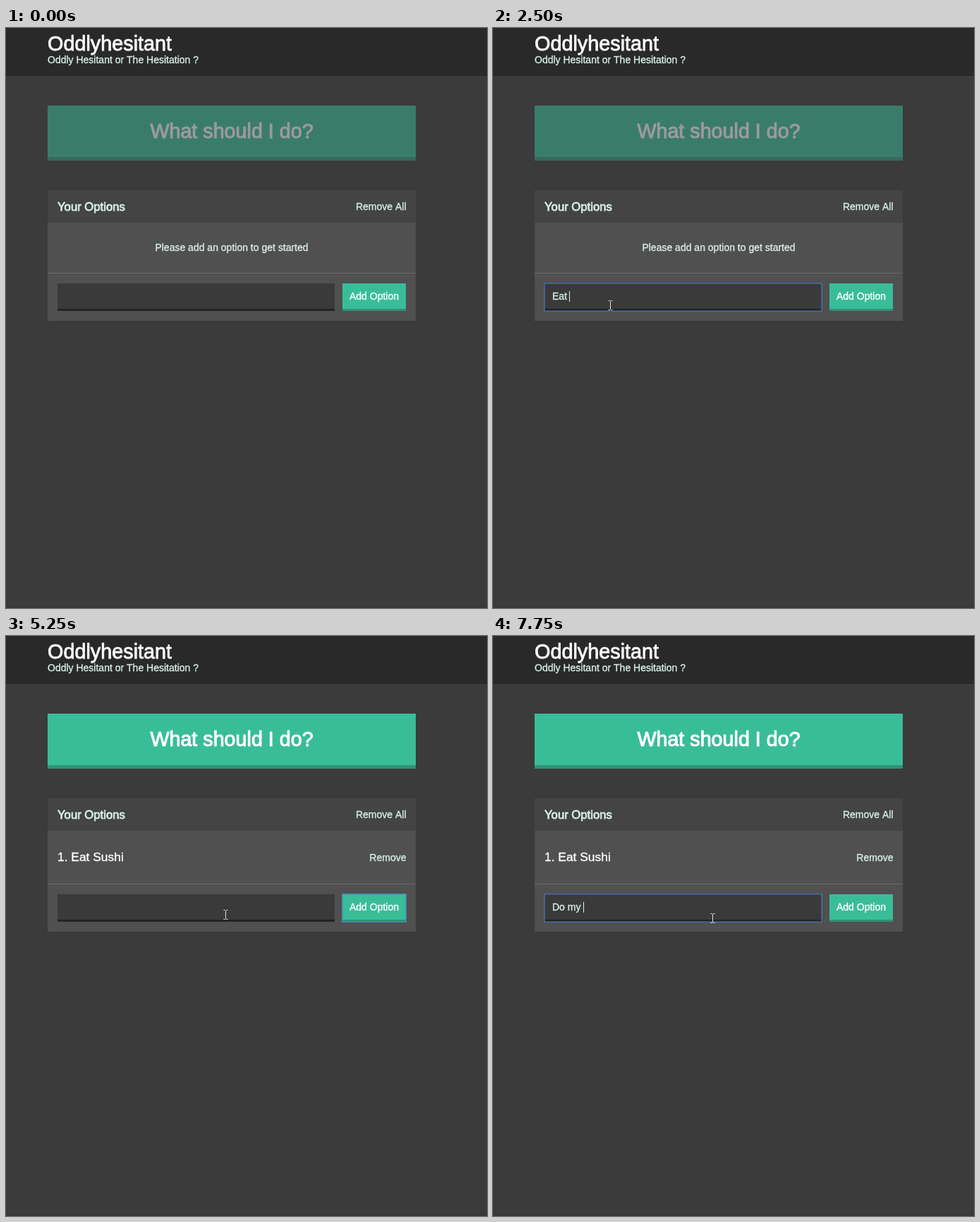
Write an HTML page with a canvas that moves like this. It is 682 px wide and 822 px high and loops after 8 s.

```html
<!DOCTYPE html>
<html lang="en">
<head>
<meta charset="utf-8">
<title>Option picker</title>
<style>
  html, body { margin: 0; width: 100%; height: 100%; overflow: hidden; background: #3b3b3b; }
  canvas { display: block; }
</style>
</head>
<body>
<canvas id="stage" width="682" height="822"></canvas>
<script>
const ctx = document.getElementById('stage').getContext('2d');
const LOOP = 8000;
const SANS = '"Liberation Sans", Arial, sans-serif';
const MENU_FONT = '"Open Sans", sans-serif';
const BODY = 14;
const PALE = '#d8efe9';
const GREEN = '#39bd99';
const HISTORY = ['a', 'd', 'b', 'c'];

// Each entry overrides the state from its time on.
const timeline = [
  { at: 0, typed: '', caret: false, focus: '', menu: null, added: false, pointer: null },
  { at: 750, pointer: ['arrow', 459, 528] },
  { at: 1000, pointer: ['beam', 200, 357] },
  { at: 1250, pointer: ['beam', 166.5, 393] },
  { at: 1500, focus: 'input', caret: true, menu: HISTORY },
  { at: 1750, typed: 'E', menu: null },
  { at: 2000, typed: 'Ea' },
  { at: 2250, typed: 'Eat' },
  { at: 2500, typed: 'Eat ' },
  { at: 2750, typed: 'Eat Su' },
  { at: 3000, typed: 'Eat Sush' },
  { at: 3250, typed: 'Eat Sushi' },
  { at: 3750, pointer: ['beam', 230, 392] },
  { at: 4000, pointer: ['beam', 400, 392] },
  { at: 4250, pointer: ['hand', 520, 389] },
  { at: 4500, pointer: ['hand', 534, 391] },
  { at: 4750, added: true, typed: '', caret: false, focus: 'button' },
  { at: 5000, pointer: ['beam', 420, 395] },
  { at: 5250, pointer: ['beam', 311.5, 395] },
  { at: 5500, focus: 'input', caret: true, menu: [...HISTORY, 'Eat Sushi'], pointer: ['beam', 311.5, 400] },
  { at: 6000, caret: false },
  { at: 6500, typed: 'D', caret: true, menu: ['d'] },
  { at: 6750, typed: 'Do', menu: null },
  { at: 7250, typed: 'Do ' },
  { at: 7500, typed: 'Do m' },
  { at: 7750, typed: 'Do my ' }
];

function rect(x, y, w, h, color) {
  ctx.fillStyle = color;
  ctx.fillRect(x, y, w, h);
}

// weight thickens the strokes to a medium face.
function text(str, x, y, { size = BODY, color = PALE, align = 'left', weight = .35, family = SANS } = {}) {
  ctx.font = `${size}px ${family}`;
  ctx.textAlign = align;
  ctx.fillStyle = ctx.strokeStyle = color;
  ctx.fillText(str, x, y);
  if (weight) {
    ctx.lineWidth = weight;
    ctx.lineJoin = 'round';
    ctx.strokeText(str, x, y);
  }
}

function ring(x, y, w, h, color) {
  ctx.strokeStyle = color;
  ctx.lineWidth = 1.6;
  ctx.lineJoin = 'round';
  ctx.strokeRect(x + .8, y + .8, w - 1.6, h - 1.6);
}

function drawHeader() {
  rect(0, 0, 682, 822, '#3b3b3b');
  rect(0, 819, 682, 3, '#383838');
  rect(0, 0, 682, 68, '#292929');
  text('Oddlyhesitant', 59, 32, { size: 28.8, color: '#fff', weight: .8 });
  text('Oddly Hesitant or The Hesitation ?', 59, 50);
}

function drawAction(enabled) {
  rect(59, 110, 522, 73, enabled ? GREEN : '#3a7c6a');
  rect(59, 183, 522, 5, enabled ? '#2f9378' : '#36685b');
  text('What should I do?', 320, 156, {
    size: 28.7, align: 'center', weight: 1, color: enabled ? '#fff' : '#9b9b9b'
  });
}

function drawOptions(added) {
  rect(59, 230, 522, 185 + (added ? 4 : 0), '#505050');
  rect(59, 230, 522, 46, '#444');
  text('Your Options', 73, 258.5, { size: 16.7, weight: .8 });
  text('Remove All', 567.5, 258, { align: 'right' });
  if (added) {
    text('1. Eat Sushi', 73, 319, { size: 17.4, color: '#fff' });
    text('Remove', 567.5, 318.5, { align: 'right' });
  } else {
    text('Please add an option to get started', 320, 316, { align: 'center' });
  }
}

function drawForm({ typed, caret, focus }) {
  rect(59, 347, 522, 1, '#6a6a6a');
  rect(73, 362, 393, 36, '#3a3a3a');
  rect(73, 398, 393, 3, '#242424');
  rect(477, 362, 90, 36, GREEN);
  rect(477, 398, 90, 3, '#2f9378');
  if (focus === 'input') ring(72, 361, 395, 41, '#486ea6');
  if (focus === 'button') ring(476, 361, 92, 41, '#4a88b4');
  text('Add Option', 522, 385, { color: '#fff', align: 'center' });
  text(typed, 84, 385);
  if (caret) rect(Math.floor(84 + ctx.measureText(typed).width), 373, 1, 15, '#e4f2ef');
}

function drawMenu(items) {
  ctx.save();
  ctx.shadowColor = 'rgba(0, 0, 0, .5)';
  ctx.shadowBlur = 4;
  ctx.shadowOffsetY = 1;
  ctx.fillStyle = '#fff';
  ctx.beginPath();
  ctx.roundRect(73, 402, 393, 14 + items.length * 31.3, 3);
  ctx.fill();
  ctx.restore();
  items.forEach((item, i) =>
    text(item, 84, 429 + i * 31.3, { size: 12, color: '#222', weight: 0, family: MENU_FONT }));
}

const pointers = {
  beam: new Path2D('M-3 -6.5H-1L0 -5.5L1 -6.5H3M0 -5.5V5.5M-3 6.5H-1L0 5.5L1 6.5H3'),
  arrow: new Path2D('M0 0V16L4 12.5L6.5 18.5L9 17.5L6.5 11.5H11.5Z'),
  hand: new Path2D('M-2 1Q-2 -.5 -.5 -.5T1 1V5Q3 4 4 5.5Q6 5 6.5 6.5Q8.5 6.5 8.5 8.5V13L6.5 16V19.5H-2V17L-6.5 11Q-7 8.5 -5 9L-2 11.5Z')
};

function drawPointer([kind, x, y]) {
  ctx.save();
  ctx.translate(x, y);
  ctx.lineWidth = 1;
  ctx.fillStyle = '#fff';
  ctx.strokeStyle = kind === 'beam' ? '#e2e2e2' : '#111';
  if (kind !== 'beam') ctx.fill(pointers[kind]);
  ctx.stroke(pointers[kind]);
  if (kind === 'hand') ctx.stroke(new Path2D('M1 5V9M4 6V9M6.5 7V9.5'));
  ctx.restore();
}

function render(time) {
  const state = Object.assign({}, ...timeline.filter(step => step.at <= time));
  drawHeader();
  drawAction(state.added);
  drawOptions(state.added);
  ctx.save();
  if (state.added) ctx.translate(0, 4);
  drawForm(state);
  if (state.menu) drawMenu(state.menu);
  ctx.restore();
  if (state.pointer) drawPointer(state.pointer);
}

const start = performance.now();
function tick() {
  render((performance.now() - start) % LOOP);
  requestAnimationFrame(tick);
}
tick();
</script>
</body>
</html>
```
